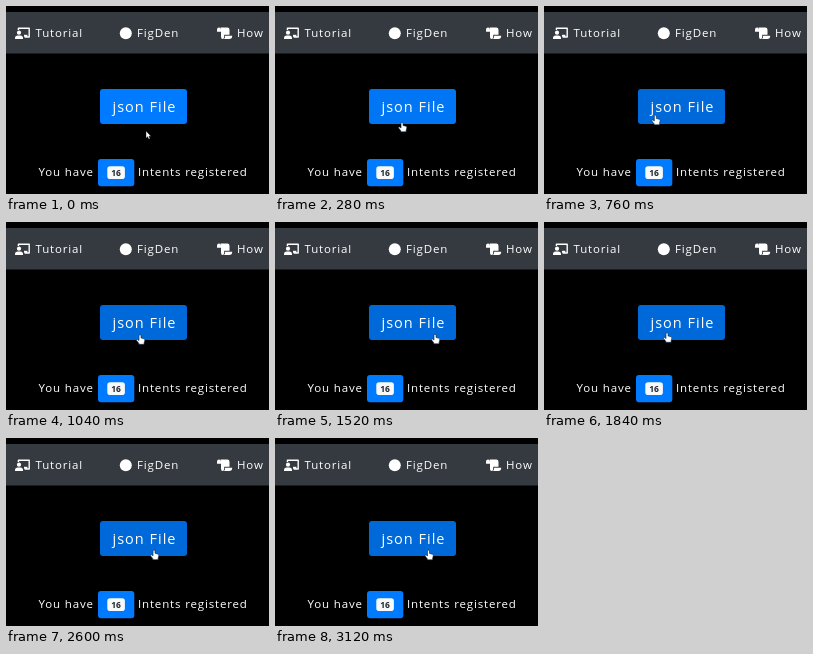
Write an HTML page that moves like this. It is 263 px wide and 188 px high and loops after 3.16 s.

```html
<!DOCTYPE html>
<html lang="en">
<head>
<meta charset="utf-8">
<style>
html, body { margin: 0; width: 100%; height: 100%; overflow: hidden; background: #000; }
svg { display: block; width: 263px; height: 188px; }
text { font: 11.5px "Open Sans", "Noto Sans", sans-serif; letter-spacing: .85px; fill: #fff; }
.label { font-size: 14.5px; letter-spacing: 1px; }
.count { font-size: 8.5px; font-weight: 700; letter-spacing: 0; fill: #212529; text-anchor: middle; }
</style>
</head>
<body>
<svg viewBox="0 0 263 188">
  <rect width="263" height="188"/>
  <rect y="6" width="263" height="41.5" fill="#343a40"/>

  <!-- board with a teacher -->
  <g fill="#fff">
    <path d="M12.4 24V22.2H23.2V31H18.6" fill="none" stroke="#fff" stroke-width="1.4" stroke-linejoin="round"/>
    <path d="M18 28.8h3.4v2H18z"/>
    <circle cx="13" cy="26.7" r="2.1"/>
    <path d="M9 33v-.6q0-2.8 2.8-2.8h2.4q2.8 0 2.8 2.8v.6z"/>
  </g>
  <text x="29.5" y="31">Tutorial</text>

  <circle cx="119.8" cy="27.2" r="6" fill="#fff"/>
  <text x="131" y="31">FigDen</text>

  <!-- scroll -->
  <g fill="#fff">
    <path d="M211 25.8v-2.3a2 2 0 0 1 4 0v2.3z"/>
    <path d="M214.6 21.4h6.6q2.3 0 2.3 2.4v5h-5.3v2q0 2.2-1.6 2.2t-1.6-2.2v-7.2q0-1.4-.4-2.2z"/>
    <path d="M219.2 29.8h7q0 3.3-2.9 3.3h-5.5q1.4-.9 1.4-3.3z"/>
  </g>
  <text x="231" y="31">How</text>

  <rect id="button" x="94" y="83" width="87" height="35" rx="3"/>
  <text class="label" x="106.5" y="106">json File</text>

  <text x="32.5" y="169.5">You have</text>
  <rect x="92" y="153" width="36.3" height="27.3" rx="3" fill="#007bff"/>
  <rect x="101.3" y="160.3" width="17.6" height="12.8" rx="2.8" fill="#f8f9fa"/>
  <text class="count" x="110.1" y="169.9">16</text>
  <text x="132" y="169.5">Intents registered</text>

  <g id="arrow">
    <path d="M0 0V7.2L1.6 5.7 2.8 8.2 4 7.6 2.9 5.2H5z" fill="#fff" stroke="#000" stroke-width=".4"/>
  </g>
  <g id="hand">
    <path d="M-1 .8Q0-.5 1 .8V3.4L4 4.3Q4.9 4.7 4.8 5.8L4.1 8.4V9.8H-1.2V8.8L-3.6 5.8Q-3.6 4.6-2.4 5L-1 6z"
      fill="#fff" stroke="#0b2748" stroke-width=".6" stroke-linejoin="round"/>
  </g>
</svg>
<script>
const LOOP = 3160, STEP = 40, HOVER_AT = 240, FADE = 150;
const byId = id => document.getElementById(id);
const button = byId('button'), arrow = byId('arrow'), hand = byId('hand');

// time, x, y of the pointer tip
const path = [
  [0, 140, 125], [120, 137, 122], [240, 130, 117], [360, 121, 115],
  [480, 115, 116], [600, 109, 113], [720, 110, 109], [880, 120, 109],
  [1040, 134, 112.5], [1120, 140, 112], [1280, 156, 109], [1400, 163, 110],
  [1520, 160, 112], [1680, 141, 110], [1840, 123, 110.5], [2040, 115, 110.5],
  [2240, 115, 110.5], [2320, 118.5, 110.5], [2520, 142, 111.5], [2680, 151, 112],
  [3040, 151, 112], [3120, 153.5, 112]
];

const slope = (i, axis) =>
  (path[i + 1][axis] - path[i][axis]) / (path[i + 1][0] - path[i][0]);

// Zero at rests and turning points, so the curve never overshoots
function tangent(i, axis) {
  if (i === 0 || i === path.length - 1) return 0;
  const a = slope(i - 1, axis), b = slope(i, axis);
  return a * b > 0 ? 2 * a * b / (a + b) : 0;
}

function pointerAt(t, axis) {
  let i = 0;
  while (i < path.length - 2 && t >= path[i + 1][0]) i++;
  const span = path[i + 1][0] - path[i][0];
  const u = Math.min(1, (t - path[i][0]) / span), v = 1 - u;
  return path[i][axis] * (1 + 2 * u) * v * v
    + path[i + 1][axis] * (3 - 2 * u) * u * u
    + span * u * v * (tangent(i, axis) * v - tangent(i + 1, axis) * u);
}

function draw(time) {
  const t = Math.floor(time % LOOP / STEP) * STEP;
  const hovering = t >= HOVER_AT;
  const fade = Math.max(0, Math.min(1, (t - HOVER_AT) / FADE));
  button.setAttribute('fill', `rgb(0,${123 - 18 * fade},${255 - 38 * fade})`);

  const place = `translate(${pointerAt(t, 1)} ${pointerAt(t, 2)})`;
  for (const [shape, shown] of [[arrow, !hovering], [hand, hovering]]) {
    shape.setAttribute('transform', place);
    shape.setAttribute('visibility', shown ? 'visible' : 'hidden');
  }
}

const start = performance.now();
function tick() {
  draw(performance.now() - start);
  requestAnimationFrame(tick);
}
tick();
</script>
</body>
</html>
```
